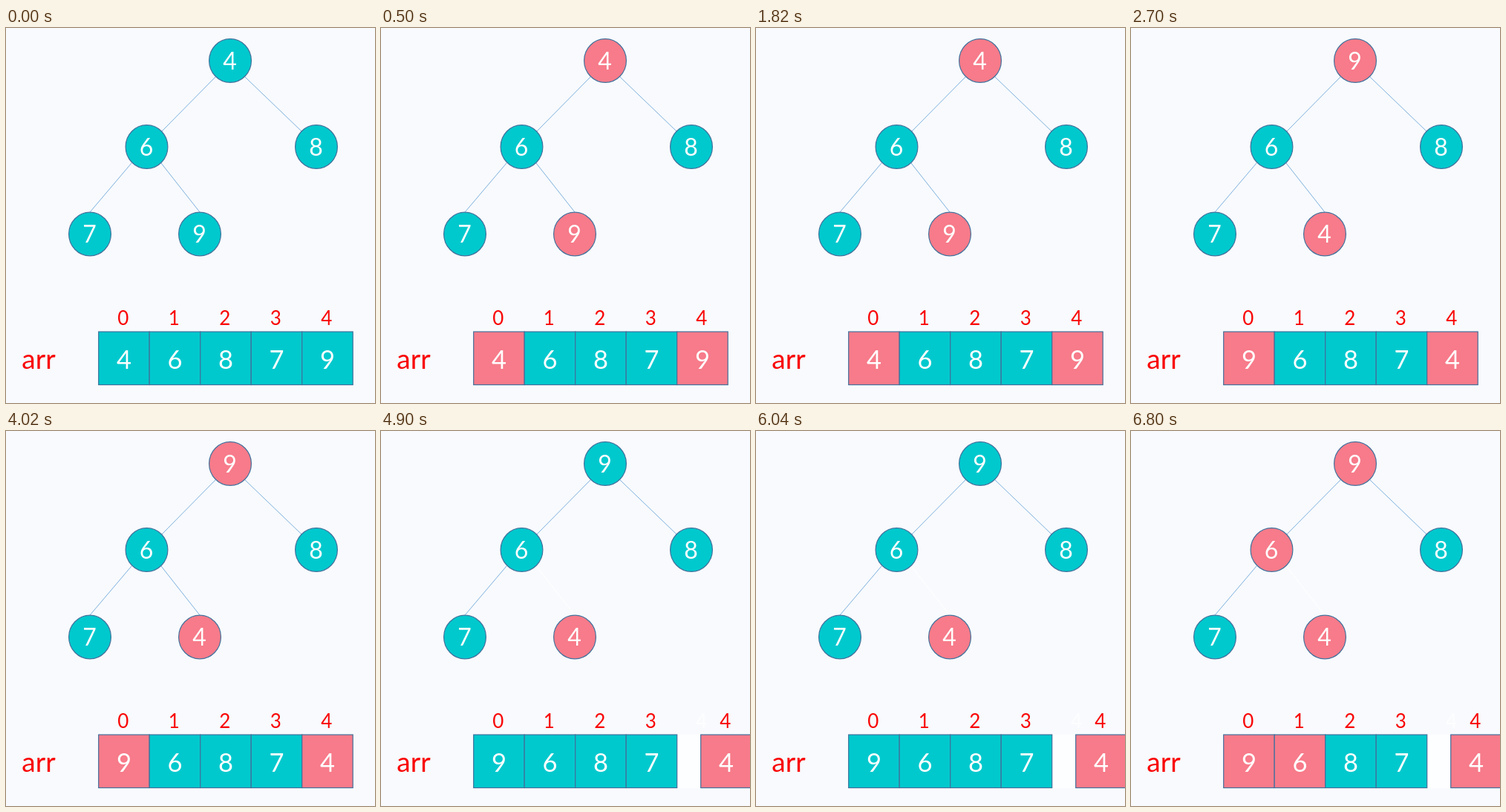
An HTML page with a canvas that plays this animation: 497x505 px, repeating every 8 s.

```html
<!DOCTYPE html>
<html>
<head>
<meta charset="utf-8">
<title>Heap sort</title>
<style>
html, body { margin: 0; width: 100%; height: 100%; overflow: hidden; background: #f8fafd; }
canvas { display: block; }
</style>
</head>
<body>
<canvas id="stage" width="497" height="505"></canvas>
<script>
const ctx = document.getElementById("stage").getContext("2d");
const TEAL = "#00c9cd", PINK = "#f77b8a", RED = "#f90505", GHOST = "#fdfeff";
const nodes = [[302, 44], [189.5, 160], [418, 160], [113, 277.5], [261, 277.5]];
const edges = [
  [282, 66, 210, 139],
  [322, 66, 398, 139],
  [169, 182, 113, 248],
  [209, 182, 261, 248]
];
// Each step: start time, values, highlighted indices, last item detached
const steps = [
  { at: 0, values: [4, 6, 8, 7, 9], hot: [] },
  { at: 500, values: [4, 6, 8, 7, 9], hot: [0, 4] },
  { at: 2700, values: [9, 6, 8, 7, 4], hot: [0, 4] },
  { at: 4900, values: [9, 6, 8, 7, 4], hot: [4], split: true },
  { at: 6800, values: [9, 6, 8, 7, 4], hot: [0, 1, 4], split: true }
];

function text(str, x, y, size, color) {
  ctx.font = `${size}px Lato, Carlito, sans-serif`;
  ctx.fillStyle = color;
  ctx.fillText(str, x, y);
}

function drawTree({ values, split }, fill) {
  edges.forEach(([x1, y1, x2, y2], i) => {
    ctx.strokeStyle = split && i === 3 ? GHOST : "#70a8da";
    ctx.lineWidth = split && i === 3 ? 1.5 : 0.9;
    ctx.beginPath();
    ctx.moveTo(x1, y1);
    ctx.lineTo(x2, y2);
    ctx.stroke();
  });
  ctx.strokeStyle = "#41719c";
  ctx.lineWidth = 1.2;
  nodes.forEach(([x, y], i) => {
    ctx.beginPath();
    ctx.ellipse(x, y, 28.4, 29.3, 0, 0, Math.PI * 2);
    ctx.fillStyle = fill(i);
    ctx.fill();
    ctx.stroke();
    text(values[i], x - 0.5, y + 11.7, 32, "#fff");
  });
}

function drawArray({ values, split }, fill) {
  text("arr", 44, 459, 37, RED);
  if (split) {
    ctx.fillStyle = GHOST;
    ctx.fillRect(399, 408.5, 32, 73);
    text("4", 431.5, 400, 26, GHOST);
  }
  values.forEach((value, i) => {
    const shift = split && i === 4 ? 32 : 0;
    const x = 124.7 + i * 68.5 + shift;
    ctx.fillStyle = fill(i);
    ctx.fillRect(x, 409, 68.5, 71.5);
    ctx.strokeRect(x, 409, 68.5, 71.5);
    text(value, x + 34.3, 458.7, 34.5, "#fff");
    text(i, x + 33, 400, 26, RED);
  });
}

function draw(now) {
  const t = now % 8000;
  const step = steps.findLast(s => s.at <= t);
  const fill = i => step.hot.includes(i) ? PINK : TEAL;
  ctx.fillStyle = "#f8fafd";
  ctx.fillRect(0, 0, 497, 505);
  ctx.textAlign = "center";
  drawTree(step, fill);
  drawArray(step, fill);
}

const start = performance.now();
function tick() {
  draw(performance.now() - start);
  requestAnimationFrame(tick);
}
tick();
</script>
</body>
</html>
```
